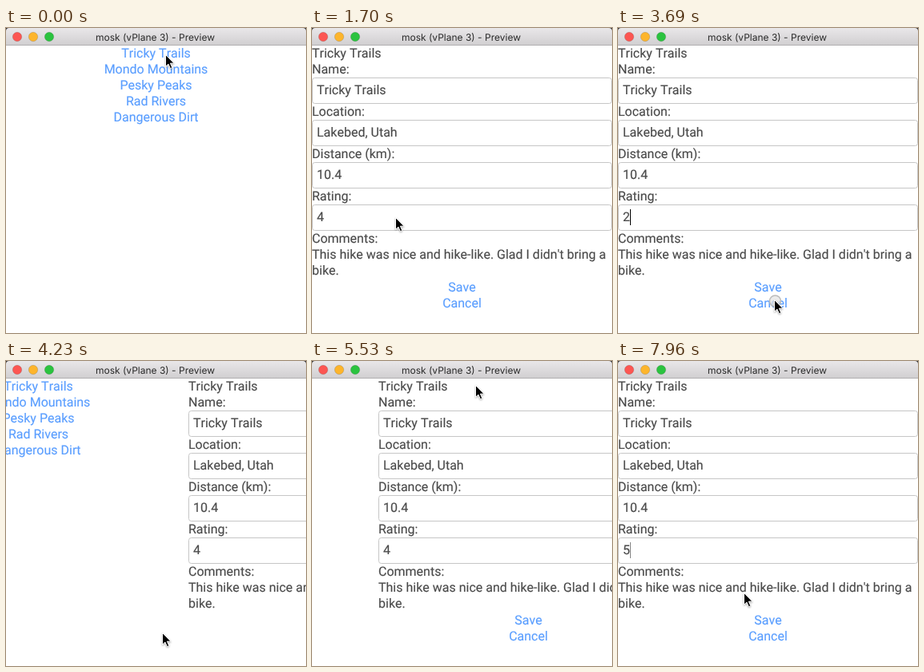
An HTML page that plays this animation: 375x382 px, repeating every 7.99 s.

```html
<!DOCTYPE html>
<html lang="en">
<head>
<meta charset="utf-8">
<title>Hike editor preview</title>
<style>
  html, body { margin: 0; width: 100%; height: 100%; overflow: hidden; background: #fff; }
  svg { display: block; width: 375px; height: 382px; }
  text {
    font: 16px Roboto, sans-serif; font-kerning: none; text-rendering: geometricPrecision;
    fill: #4a4a4a; stroke: #4a4a4a; stroke-width: .15; white-space: pre;
  }
  .link { fill: #5a9eff; stroke: #5a9eff; text-anchor: middle; }
  .title { font: 12px Inter, sans-serif; fill: #2a2a2a; stroke: none; text-anchor: middle; }
  .field { fill: #fff; stroke: #c6c6c6; }
  .arrow { stroke: #fff; filter: drop-shadow(0 1px 1px #0005); }
</style>
</head>
<body>
<svg viewBox="0 0 375 382">
  <defs>
    <linearGradient id="chrome" x2="0" y2="1">
      <stop stop-color="#e9e7e9"/><stop offset="1" stop-color="#d0ced0"/>
    </linearGradient>
  </defs>
  <g id="list"></g>
  <g id="detail"></g>
  <rect width="375" height="6" fill="#333"/>
  <path d="M0 22V4Q0 0 4 0H371Q375 0 375 4V22Z" fill="url(#chrome)"/>
  <path d="M0 21.5H375" stroke="#b1afb1"/>
  <g id="lights" stroke="#0002"></g>
  <text class="title" x="186.5" y="16">mosk (vPlane 3) - Preview</text>
  <g id="pointer">
    <circle id="press" cx="1.5" cy="2" r="7" fill="#e4e4e4" fill-opacity=".75" stroke="#bbb" stroke-width="1.5"/>
    <path class="arrow" d="M.5 .5V15.3L3.9 12.1 6.4 17.7 8.8 16.7 6.4 11.2H11Z"/>
  </g>
</svg>
<script>
const LOOP = 7990, WIDTH = 375, SLIDE = 560;
const $ = id => document.getElementById(id);

function add(parent, tag, attrs, content = '') {
  const el = document.createElementNS('http://www.w3.org/2000/svg', tag);
  for (const key in attrs) el.setAttribute(key, attrs[key]);
  el.textContent = content;
  return parent.appendChild(el);
}

const list = $('list'), detail = $('detail'), pointer = $('pointer'), press = $('press');
const label = (y, s, x = 0) => add(detail, 'text', { x, y }, s);
const link = (parent, y, s) => add(parent, 'text', { class: 'link', x: 187.5, y }, s);

['#fc5652', '#fdb52c', '#2bc33f'].forEach((fill, i) =>
  add($('lights'), 'circle', { cx: 14 + 20 * i, cy: 11, r: 5.7, fill }));

['Tricky Trails', 'Mondo Mountains', 'Pesky Peaks', 'Rad Rivers', 'Dangerous Dirt']
  .forEach((name, i) => link(list, 37 + 20 * i, name));

label(37, 'Tricky Trails');
const values = [
  ['Name:', 'Tricky Trails'], ['Location:', 'Lakebed, Utah'],
  ['Distance (km):', '10.4'], ['Rating:', '4']
].map(([name, value], i) => {
  const y = 57 + 53 * i;
  label(y, name);
  add(detail, 'rect', { class: 'field', x: .5, y: y + 5.5, width: 374, height: 32, rx: 3 });
  return label(y + 26, value, 6);
});
const rating = values[3];
const caret = add(detail, 'rect', { y: 227, width: 1, height: 20 });
label(269, 'Comments:');
label(289, "This hike was nice and hike-like. Glad I didn't bring a");
label(309, 'bike.');
link(detail, 330, 'Save');
link(detail, 350, 'Cancel');

// [time, x, y]
const path = [
  [0, 199, 33], [300, 198, 31], [900, 198, 31], [1500, 106, 241], [1660, 104, 237],
  [2930, 104, 237], [3560, 195, 340], [4280, 195, 340], [4490, 195, 334],
  [4630, 195, 334], [5060, 204, 31], [5300, 204, 30], [5680, 204, 30],
  [6270, 102, 241], [6330, 101, 238], [7590, 101, 238], [7960, 157, 290]
];
// [time, text]
const typed = [[0, '4'], [2450, ''], [2680, '2'], [3930, '4'], [6960, ''], [7240, '5']];
// [from, to]
const presses = [[160, 280], [1780, 1940], [3600, 3960], [5060, 5210], [6620, 6760]];
const carets = [[1800, 3320], [3520, 3925], [6640, 7930]];

const clamp = v => Math.min(1, Math.max(0, v));
const smooth = u => u * u * (3 - 2 * u);
const cubic = u => u < .5 ? 4 * u ** 3 : 1 - 4 * (1 - u) ** 3;
const slide = (t, start) => cubic(clamp((t - start) / SLIDE));
const shown = (spans, t, fade) => Math.max(...spans.map(([a, b]) =>
  Math.min(clamp((t - a) / fade + 1), clamp((b - t) / fade + 1))));

function pointerAt(t) {
  const i = path.findIndex(p => p[0] > t);
  if (i < 0) return path[path.length - 1].slice(1);
  const [a, ax, ay] = path[i - 1], [b, bx, by] = path[i];
  const u = smooth((t - a) / (b - a));
  return [ax + (bx - ax) * u, ay + (by - ay) * u];
}

function draw(t) {
  const p = slide(t, 260) - slide(t, 3929) + slide(t, 5184);
  const x = Math.round(WIDTH * (1 - p));
  list.setAttribute('transform', `translate(${x - WIDTH})`);
  detail.setAttribute('transform', `translate(${x})`);

  const value = typed.filter(k => k[0] <= t).pop()[1];
  rating.textContent = value;
  caret.setAttribute('x', value ? 15 : 6);
  caret.setAttribute('opacity', t >= 3930 && t < 6500 ? 0 : shown(carets, t, 60));

  pointer.setAttribute('transform', `translate(${pointerAt(t).map(Math.round)})`);
  press.setAttribute('opacity', shown(presses, t, 60));
}

function tick() {
  draw(performance.now() % LOOP);
  requestAnimationFrame(tick);
}
tick();
</script>
</body>
</html>
```
